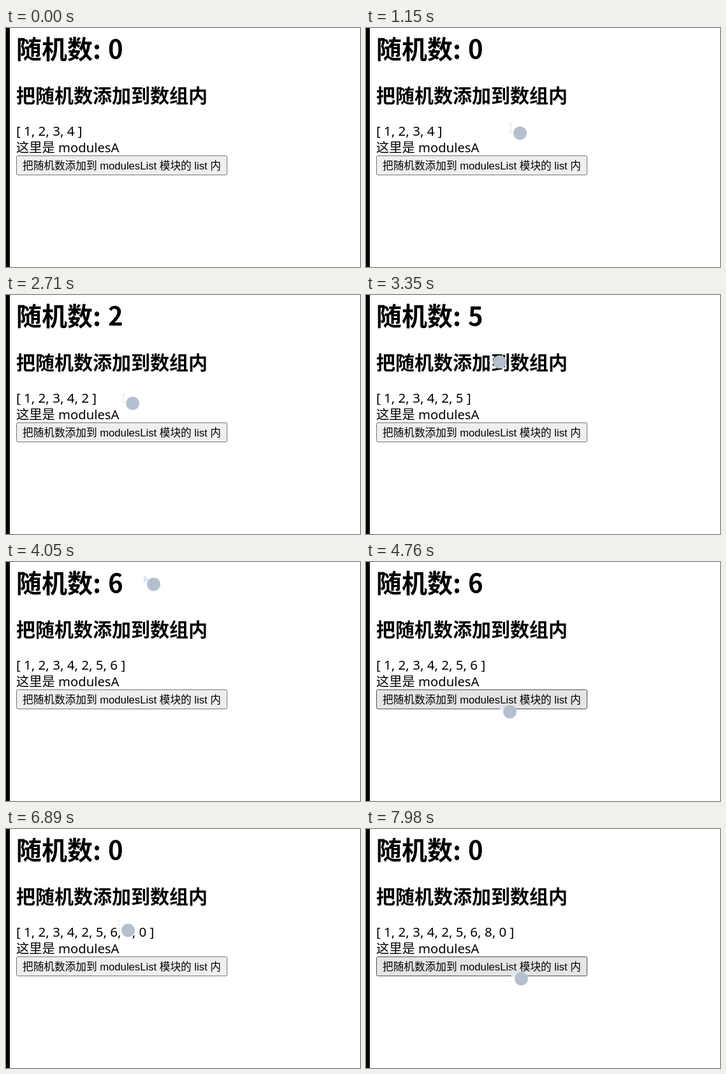
Animation, 555 px wide and 375 px high, one loop 8 s. Source, as an HTML page:

```html
<!DOCTYPE html>
<html lang="zh">
<head>
<meta charset="utf-8">
<style>
  html, body { margin: 0; width: 100%; height: 100%; overflow: hidden; background: #fff; }
  svg { display: block; }
  text { font-family: "Noto Sans", "Noto Sans CJK SC", "Noto Sans CJK", sans-serif; font-size: 20.5px; white-space: pre; }
  .title { font-family: "Noto Sans CJK SC", "Noto Sans CJK", sans-serif; font-weight: bold; }
  .label { font-family: "Liberation Sans", "Noto Sans CJK SC", "Noto Sans CJK", sans-serif; font-size: 16.667px; }
</style>
</head>
<body>
<svg width="555" height="375">
  <rect width="6" height="375"/>
  <text class="title" id="number" x="16" y="48" style="font-size:40px; word-spacing:2px"></text>
  <text class="title" x="16" y="117" style="font-size:30px">把随机数添加到数组内</text>
  <text id="list" x="16" y="169"></text>
  <text x="16" y="195" style="font-size:20.25px">这里是 modulesA</text>
  <rect id="button" x="16.5" y="200.5" width="330" height="30" rx="2"/>
  <text class="label" x="26" y="222">把随机数添加到 modulesList 模块的 list 内</text>
  <g id="cursor">
    <path id="pointer"/>
    <circle cx="15.5" cy="15" r="10.5" fill="#b4bfcf"/>
  </g>
</svg>
<script>
const $ = id => document.getElementById(id);
const LOOP = 8000, STEP = 78.4, ENTER = 370, CLICK_DELAY = 70;

// The pointer rests on the button; each sweep takes it up and back, some after a click
const sweeps = [
  { start: 830, end: 1610, rise: 120, sway: 10 },
  { start: 1850, end: 2710, rise: 203, sway: -44, adds: 2 },
  { start: 2720, end: 3500, rise: 203, sway: -14, adds: 5 },
  { start: 3590, end: 4760, rise: 209, sway: 10, adds: 6 },
  { start: 5070, end: 6570, rise: 144, sway: 8, adds: 8 },
  { start: 6660, end: 7040, rise: 78, sway: -44, adds: 0 },
  { start: 7270, end: 7970, rise: 66, sway: 0 }
];
const clicks = sweeps.filter(s => "adds" in s);

const shapes = {
  arrow: "M0 0V13L3 10L10 10Z",
  beam: "M-2 0H4M1 0V13M-2 13H4",
  hand: "M0 0L2 0V5L8 7V12H1L-3 7L0 8Z"
};

const progress = (t, start, end) => Math.min(1, Math.max(0, (t - start) / (end - start)));

function tipAt(t) {
  const slideIn = 1 - progress(t, ENTER, 600), approach = 1 - progress(t, 830, 1610);
  let x = 186 + 91 * slideIn + 48 * approach;
  let y = 220 + 61 * slideIn + 79 * approach;
  for (const { start, end, rise, sway } of sweeps) {
    const k = progress(t, start, end);
    const lift = k < 1 ? Math.sin(Math.PI * k) ** 0.8 : 0;
    x += 6 * k + sway * lift;
    y -= rise * lift;
  }
  return [Math.round(x), Math.round(y)];
}

function set(id, attributes) {
  for (const name in attributes) $(id).setAttribute(name, attributes[name]);
}

function draw() {
  const now = performance.now() % LOOP;
  const added = clicks.filter(c => c.start + CLICK_DELAY <= now).map(c => c.adds);
  $("number").textContent = "随机数: " + (added[added.length - 1] ?? 0);
  $("list").textContent = `[ ${[1, 2, 3, 4, ...added].join(", ")} ]`;

  // The pointer moves in coarse steps
  const [x, y] = tipAt(ENTER + Math.floor((now - ENTER + 8) / STEP) * STEP);
  const visible = now >= ENTER;
  const hover = visible && x > 16 && x < 347 && y >= 200 && y <= 231;
  const pressed = hover && clicks.some(c => Math.abs(now - c.start) < CLICK_DELAY);
  set("button", pressed ? { fill: "#f5f5f5", stroke: "#8d8d8d" }
    : hover ? { fill: "#e5e5e5", stroke: "#4f4f4f" }
    : { fill: "#efefef", stroke: "#767676" });

  const overText = (x < 316 && y > 84 && y < 126) || (x < 235 && y > 140 && y < 200) || (x < 184 && y < 58);
  const kind = hover ? "hand" : overText ? "beam" : "arrow";
  set("pointer", {
    d: shapes[kind],
    fill: kind === "beam" ? "none" : "#d8e9f8",
    stroke: kind === "beam" ? "#dce8f6" : "none"
  });
  set("cursor", { transform: `translate(${x} ${y})`, visibility: visible ? "visible" : "hidden" });
  requestAnimationFrame(draw);
}
draw();
</script>
</body>
</html>
```
